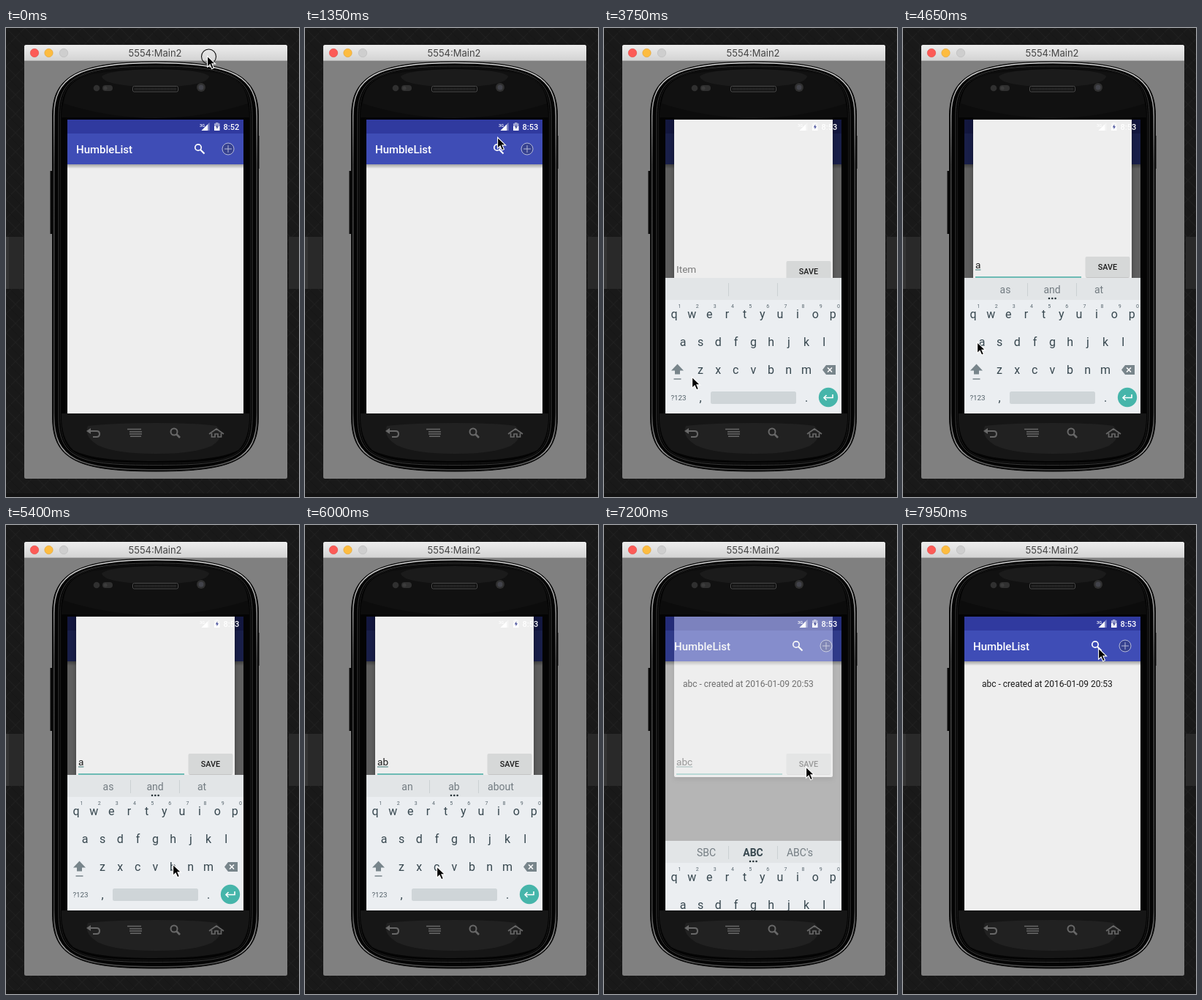
Write an HTML page that moves like this. It is 401 px wide and 640 px high and loops after 8 s.

```html
<!DOCTYPE html>
<html lang="en">
<head>
<meta charset="utf-8">
<title>Todo demo</title>
<style>
html, body { margin: 0; width: 100%; height: 100%; overflow: hidden; background: #191919; }
svg { display: block; width: 100vw; height: 100vh; }
text { font-family: Roboto, sans-serif; }
.med { font-weight: 500; }
.mid { text-anchor: middle; }
.key { font-size: 16px; fill: #37474f; }
.hint { font-size: 7px; fill: #58666e; }
.sug { font-size: 14px; fill: #737c82; }
</style>
</head>
<body>
<svg viewBox="0 0 401 640">
  <defs>
    <pattern id="weave" width="26" height="26" patternUnits="userSpaceOnUse">
      <rect width="26" height="26" fill="#191919"/>
      <path d="M0 0L26 26M0 26L26 0" stroke="#1f1f1f" stroke-width="1.2"/>
      <path d="M13 0L26 13M0 13L13 26" stroke="#161616"/>
    </pattern>
    <linearGradient id="bar" x2="0" y2="1">
      <stop stop-color="#ededed"/><stop offset="1" stop-color="#d3d3d3"/>
    </linearGradient>
    <linearGradient id="rim" x2="0" y2="1">
      <stop stop-color="#d8d8d8"/><stop offset=".1" stop-color="#a5a5a5"/>
      <stop offset=".25" stop-color="#484848"/><stop offset=".86" stop-color="#404040"/>
      <stop offset=".95" stop-color="#a0a0a0"/><stop offset="1" stop-color="#444"/>
    </linearGradient>
    <linearGradient id="shade" x2="0" y2="1">
      <stop stop-opacity=".32"/><stop offset="1" stop-opacity="0"/>
    </linearGradient>
    <filter id="soft" x="-20%" y="-20%" width="140%" height="140%"><feGaussianBlur stdDeviation="3"/></filter>
    <clipPath id="screen"><path d="M84 125h241v401h-241z"/></clipPath>
  </defs>

  <rect width="401" height="640" fill="url(#weave)"/>
  <path d="M0 285h24v71H0zM387 285h14v71h-14z" fill="#292929"/>
  <path d="M0 285h4v71H0z" fill="#343434"/>
  <path d="M0 635h401v5H0z" fill="#131313"/>

  <rect x="25" y="23" width="360" height="592" rx="2.5" fill="#808080"/>
  <path d="M25 44.5V25.500q0-2.500 2.500-2.500H382.500q2.500 0 2.500 2.500V44.5z" fill="url(#bar)"/>
  <path d="M25 44.5H385" stroke="#b4b4b4"/>
  <circle cx="39" cy="34" r="5.700" fill="#fc5b57" stroke="#e2463f" stroke-width=".6"/>
  <circle cx="58.500" cy="34" r="5.700" fill="#fdbc40" stroke="#dfa033" stroke-width=".6"/>
  <circle cx="79" cy="34" r="5.700" fill="#cecece" stroke="#bcbcbc" stroke-width=".7"/>
  <text x="204" y="39" class="mid" font-size="13" fill="#454545" style="font-family:Inter,sans-serif">5554:Main2</text>

  <path d="M60.500 195h5v86h-5zM343 147h3.500v45h-3.500z" fill="#080808"/>
  <g id="body"></g>
  <path d="M76 122Q76 62 140 57Q205 53 270 57Q333 62 333 122z" fill="#0c0c0c"/>
  <path d="M79 103C83 65 110 58 205 57S327 65 331 103Q205 143 79 103z" fill="#111"/>
  <path d="M131 66Q140 57 205 56Q270 57 278 66Q275 80 205 80Q135 80 131 66z" fill="#1b1b1b"/>
  <path d="M76 526H333Q334 560 318 576Q290 591 205 591Q119 591 92 576Q75 560 76 526z" fill="#161616"/>
  <path d="M112 543Q150 539 205 539Q258 539 288 543Q302 557 282 570Q258 581 205 581Q152 581 127 570Q106 558 112 543z" fill="#212121"/>
  <g fill="#303030">
    <circle cx="124" cy="82" r="4.300"/><rect x="132" y="78" width="14" height="8" rx="4"/>
    <circle cx="267" cy="81" r="6"/><circle cx="267" cy="81" r="3.500" fill="#42434a"/>
    <circle cx="136" cy="82" r="2.500" fill="#3c3c3c"/>
  </g>
  <rect x="173.500" y="79.500" width="62" height="7.500" rx="2" fill="#0c0c0c" stroke="#4c4c4c"/>
  <path d="M176 83.200H234" stroke="#383838" stroke-width="4" stroke-dasharray="1 1"/>
  <g fill="none" stroke="#686868" stroke-width="2">
    <path d="M114 550H124q4 0 4 4t-4 4H119"/><path d="M110 550l6-4v8z" fill="#686868" stroke="none"/>
    <path d="M166 547.500H185M169 551H186M169 554H186M170 557.200H185" stroke-width="1.600"/>
    <circle cx="230" cy="551" r="4.500"/><path d="M233 554l5 5" stroke-width="2.600"/>
    <path d="M278 554l10-7 10 7M281.500 553v5h4.500v-4h4v4h4.500v-5" stroke-width="1.700"/>
  </g>

  <g clip-path="url(#screen)">
    <path d="M84 125h241v401H84z" fill="#eee"/>
    <path d="M84 186h241v6H84z" fill="url(#shade)"/>
    <path d="M84 125h241v19H84z" fill="#303a9f"/>
    <path d="M84 144h241v42H84z" fill="#3f4db6"/>
    <text x="96" y="171" class="med" font-size="15" fill="#fff">HumbleList</text>
    <g fill="none" stroke="#fff">
      <circle cx="263" cy="163" r="4.200" stroke-width="1.700"/><path d="M266 166l5.500 5.500" stroke-width="2.100"/>
      <g stroke="#b3b8d8" stroke-width="1">
        <circle cx="304" cy="165" r="8" fill="#36418f"/><path d="M304 160v10M299 165h10"/>
      </g>
    </g>
    <text id="entry" x="108" y="221" font-size="12" fill="#191919">abc - created at 2016-01-09 20:53</text>

    <g id="modal">
      <path d="M84 125h241v401H84z" opacity=".6"/>
      <g id="dialog">
        <rect x="96" y="159" width="217" height="358" opacity=".35" filter="url(#soft)"/>
        <rect x="96" y="156" width="217" height="358" rx="2" fill="#eee"/>
        <text x="114" y="186" class="med" font-size="14.600" fill="#1c1c1c">New Todo</text>
        <text id="field" x="99" y="498" font-size="13.600"></text>
        <path id="spell" stroke="#34706f"/>
        <path d="M99 510H244" stroke="#42aaa0" stroke-width="1.500"/>
        <rect x="250" y="483" width="60" height="28" rx="2" fill="#c4c4c4"/>
        <rect id="save" x="249.500" y="482" width="61" height="28" rx="2"/>
        <text x="280" y="500" class="med mid" font-size="10.800" fill="#1c1c1c">SAVE</text>
      </g>
    </g>

    <g fill="#fff">
      <text x="265" y="134.500" class="med" font-size="5.800">3G</text>
      <path d="M278.500 129v11h-11z" opacity=".4"/><path d="M276 131.500v8.500H267.500z"/>
      <path d="M287 129h3.500v1.300h2v3.700h-7.500v-3.700h2z" opacity=".55"/><path d="M285 134h7.500v6h-7.500z"/>
      <path d="M289.300 131.500l-2.500 4h1.700v2.700l2.500-4h-1.700z" fill="#4b539c"/>
      <text id="clock" x="297.500" y="139" class="med" font-size="11"></text>
    </g>

    <g id="keyboard">
      <path d="M84 341h241v185H84z" fill="#ebeef1"/>
      <path d="M84 341h241v30H84z" fill="#e2e5e7"/>
      <path d="M170.500 348v18M237.500 348v18" stroke="#cbd0d2"/>
      <g id="words"></g>
      <g id="dots" fill="#263238"><circle cx="200" cy="369" r="1.300"/><circle cx="204.300" cy="369" r="1.300"/><circle cx="208.600" cy="369" r="1.300"/></g>
      <g id="keys"></g>
      <path d="M100.500 458.500l-8.500 9h5v5h7v-5h5z" fill="#78858b"/>
      <path d="M95.500 479h10" stroke="#78858b" stroke-width="1.500"/>
      <path d="M304 460h13v13H304l-5-6.500z" fill="#78858b"/>
      <path d="M306 463.500l6 6M312 463.500l-6 6" stroke="#fff" stroke-width="1.500"/>
      <rect x="146" y="496" width="117" height="17" rx="2.500" fill="#cfd5d8"/>
      <circle cx="307" cy="504" r="13.200" fill="#46b5aa"/>
      <path d="M313 500v4.500H301M304.500 501l-3.500 3.500 3.500 3.500" fill="none" stroke="#fff" stroke-width="1.600"/>
    </g>
  </g>

  <g id="cursor">
    <circle id="ring" cx="2.500" cy="1" r="10" fill="#fff" fill-opacity=".12" stroke="#111" stroke-width="1.100"/>
    <path d="M.6 .3V15.300L4.100 12 6.700 17.700 9.400 16.500 6.900 10.900H11.600z" stroke="#fff" stroke-width="1.100"/>
  </g>
</svg>
<script>
const $ = id => document.getElementById(id);
const STEP = 150, LOOP = 8000;

// Cursor tip as [step, x, y], straight between rows
const path = [
  [0, 275, 38], [2, 275, 38], [7, 270, 53], [9, 263, 149], [10, 246, 160], [11, 242, 165],
  [13, 294, 170], [14, 300, 170], [17, 300, 169], [19, 189, 420], [21, 140, 490],
  [23, 134, 489], [25, 120, 476], [28, 101, 430], [32, 101, 428], [34, 175, 453],
  [36, 228, 463], [38, 228, 467], [40, 180, 466], [42, 180, 466], [45, 276, 330],
  [48, 276, 330], [50, 268, 285], [52, 258, 192], [53, 267, 168]
];
const clicks = [0, 1, 15, 21, 22, 29, 30, 37, 41, 46, 47];

// Typed text and its suggestions, by first step
const typing = [
  [0, "", []], [30, "a", ["as", "and", "at"]],
  [38, "ab", ["an", "ab", "about"]], [42, "abc", ["SBC", "ABC", "ABC's"]]
];

const label = (x, y, cls, s) => `<text x="${x}" y="${y}" class="mid ${cls}">${s}</text>`;

// Phone outline, shrunk by d
function outline(d) {
  const l = 63.5 + d, r = 345.5 - d, t = 46 + d * .7, b = 605 - d;
  return `M${l} 120C${l} 68 ${95 + d * .5} ${t} 205 ${t}S${r} 68 ${r} 120V530` +
    `C${r} 588 ${314 - d * .5} ${b} 205 ${b}S${l} 588 ${l} 530Z`;
}
const ridge = (d, fill, stroke, w) =>
  `<path d="${outline(d)}" fill="${fill}" stroke="${stroke}" stroke-width="${w}"/>`;
$("body").innerHTML = ridge(0, "#050505", "#0a0a0a", 1) + ridge(2.2, "#040404", "url(#rim)", 1.5) +
  ridge(8.5, "#000", "#4a4a4a", .8) + ridge(11, "#040404", "#1c1c1c", 1);

const row = (chars, x, y, cls) => [...chars].map((c, i) => label(x + i * 24.15, y, cls, c)).join("");
$("keys").innerHTML = row("qwertyuiop", 96, 396, "key") + row("1234567890", 103.5, 382, "hint") +
  row("asdfghjkl", 108, 434, "key") + row("zxcvbnm", 132, 472, "key") +
  label(132, 510, "key", ",") + label(277, 510, "key", ".") +
  `<text x="102" y="507.500" class="mid" font-size="9.800" fill="#526068">?123</text>`;

function tip(n) {
  const i = Math.max(1, path.findIndex(p => p[0] >= n));
  const [a, x, y] = path[i - 1], [b, u, v] = path[i];
  const k = (n - a) / (b - a);
  return [x + (u - x) * k, y + (v - y) * k];
}
const show = (id, on) => $(id).setAttribute("visibility", on ? "inherit" : "hidden");
const move = (id, x, y) => $(id).setAttribute("transform", `translate(${x} ${y})`);

function draw(n) {
  const [, typed, words] = typing.filter(r => r[0] <= n).pop();
  move("cursor", ...tip(n));
  show("ring", clicks.includes(n));
  $("clock").textContent = n < 4 ? "8:52" : "8:53";
  show("entry", n >= 48);

  show("modal", n >= 15 && n <= 48);
  $("modal").setAttribute("opacity", n === 15 ? .6 : n === 48 ? .4 : 1);
  move("dialog", 0, n < 25 ? 0 : n === 25 ? -164 : -170);
  $("save").setAttribute("fill", n === 46 || n === 47 ? "#cacccc" : "#d6d8d8");
  $("field").textContent = typed || "Item";
  $("field").setAttribute("fill", typed ? "#1c1c1c" : "#7b7b7b");
  $("spell").setAttribute("d", typed ? `M99 500H${99 + typed.length * 7.4}` : "");

  show("keyboard", n >= 24 && n <= 48);
  move("keyboard", 0, n === 24 ? 60 : n === 48 ? 90 : 0);
  show("dots", typed);
  $("words").innerHTML = words.map((w, i) =>
    `<text x="${140 + i * 64}" y="362" class="mid sug"` +
    (w === "ABC" ? ' style="font-weight:700;fill:#37474f"' : "") + `>${w}</text>`).join("");
}

let last = -1;
function tick() {
  const n = Math.floor(performance.now() % LOOP / STEP);
  if (n !== last) draw(last = n);
  requestAnimationFrame(tick);
}
tick();
</script>
</body>
</html>
```
